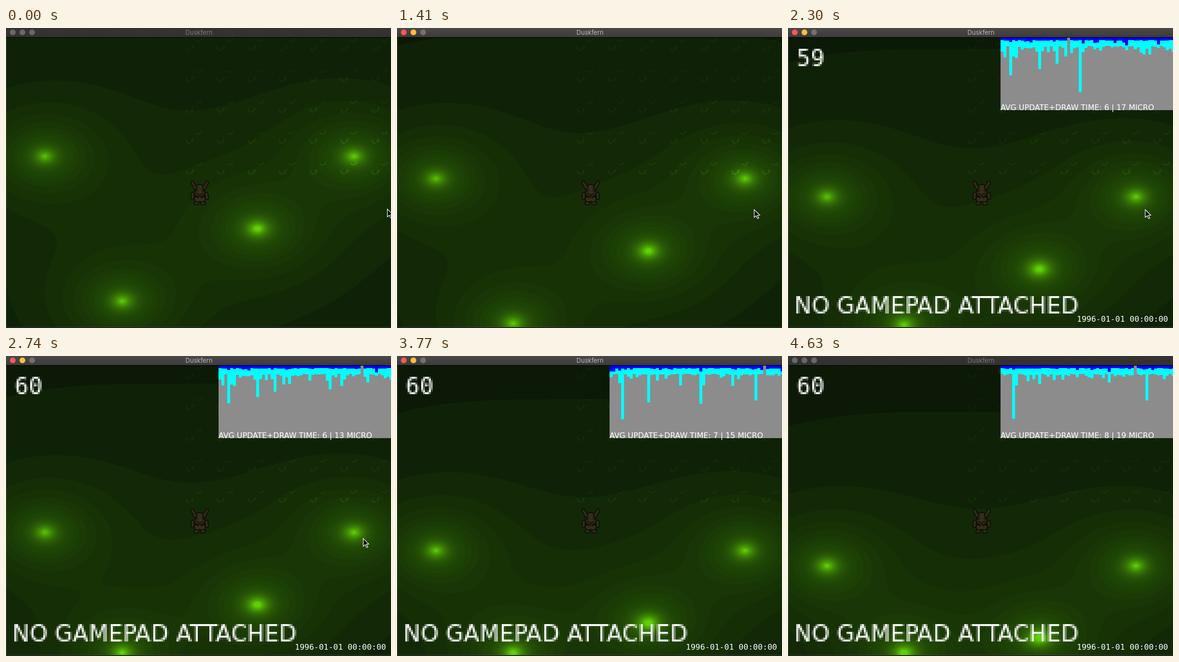
Write an HTML page with a canvas that moves like this. It is 797 by 621 pixels and loops after 4730 ms.

```html
<!DOCTYPE html>
<html lang="en">
<head>
<meta charset="utf-8">
<title>Duskfern</title>
<style>
html, body { margin: 0; width: 797px; height: 621px; overflow: hidden; background: #000; }
canvas { display: block; }
</style>
</head>
<body>
<canvas id="stage" width="797" height="621"></canvas>
<script>
const W = 797, H = 621, TOP = 20, SCENE_H = 599, LOOP = 4730;
const SANS = '"DejaVu Sans", sans-serif', MONO = '"DejaVu Sans Mono", monospace';
const ctx = document.getElementById('stage').getContext('2d');
const field = ctx.createImageData(W, SCENE_H);
const pixels = new Uint32Array(field.data.buffer);
const small = document.createElement('canvas');
small.width = 300; small.height = 40;
const smallCtx = small.getContext('2d');

// The screen refreshes in four runs of eight evenly spaced steps.
const RUNS = [[130, 1120], [1270, 2300], [2440, 3470], [3620, 4630]];
function snap(t) {
  let at = 0;
  for (const [from, to] of RUNS)
    for (let j = 0; j < 8; j++) {
      const step = from + (to - from) * j / 7;
      if (t >= step - 6) at = step;
    }
  return at;
}

// Light strength (in thousandths) to banded green; bands are finer near the lamps.
const shades = Uint32Array.from({ length: 1061 }, (_, i) => {
  const band = i < 605 ? .069 : .0345;
  const level = (Math.floor((i / 1000 + .016) / band) + .5) * band - .016;
  const green = 22 + 52 * (1 - Math.exp(-2.8 * level)) + 128 * (level / 1.06) ** 6;
  return 0xff000000 | 6 << 16 | Math.round(green) << 8 | Math.round(green * .47 - 1);
});

function drawLights(t) {
  const fall = t * .0364;
  const lights = [[80, 265], [720, 265], [520, 415], [240, 565]]
    .map(([x, y]) => [x, Math.min(y + fall, 614) - TOP]);
  for (let y = 0, i = 0; y < SCENE_H; y++)
    for (let x = 0; x < W; x++, i++) {
      let sum = 0;
      for (let k = 0; k < 4; k++) {
        const dx = (x - lights[k][0]) / 800, dy = (y - lights[k][1]) / 600;
        const d = 64 * Math.sqrt(dx * dx + dy * dy);
        sum += 1 / (1 + .09 * d + .032 * d * d);
      }
      pixels[i] = shades[Math.min(1060, sum * 1000 | 0)];
    }
  ctx.putImageData(field, 0, TOP);
}

function line(color, width, ...points) {
  ctx.beginPath();
  points.forEach(([x, y]) => ctx.lineTo(x, y));
  ctx.strokeStyle = color;
  ctx.lineWidth = width;
  ctx.stroke();
}

function drawGrass() {
  const glow = '#40382a';
  ctx.save();
  ctx.beginPath();
  ctx.rect(0, TOP, W, SCENE_H);
  ctx.clip();
  ctx.globalCompositeOperation = 'color-dodge';
  for (let row = 0; row < 6; row++)
    for (let col = 0; col < 7; col++) {
      ctx.save();
      ctx.translate(372 + 64 * col, 23 + 64 * row);
      if (row < 5) {
        line(glow, 3, [1, 16], [4, 23], [10, 23]);
        line(glow, 4, [16, 14], [12, 22]);
      }
      if (row < 5 || col) {
        ctx.beginPath();
        ctx.arc(27, -2, 6.5, 0, 2.6);
        ctx.lineWidth = 2.5;
        ctx.stroke();
      }
      ctx.restore();
    }
  ctx.restore();
}

function drawRabbit() {
  const fur = '#332d19', dark = '#0f0f08';
  ctx.save();
  ctx.translate(401, 316);
  ctx.lineCap = 'round';
  // Half of each part as width and two end points; the other half is its mirror.
  const ear = [4, [9, 15], [15, 4]], head = [16, [0, 17], [2, 24]], arm = [4, [14, 27], [15, 36]];
  const body = [11, [0, 36], [5, 38]], foot = [4, [5, 47], [9, 47]];
  const eye = [2, [5, 20], [9, 22]], muzzle = [2, [0, 30], [7, 26]], chest = [2, [3, 36], [9, 32]];
  const both = (color, grow, parts) => {
    for (const [width, ...ends] of parts)
      for (const side of [1, -1])
        line(color, width + grow, ...ends.map(([x, y]) => [x * side, y]));
  };
  for (const parts of [[body, foot], [arm], [head], [ear]]) {
    both(dark, 4, parts);
    both(fur, 0, parts);
  }
  both(dark, 0, [eye, muzzle, chest]);
  ctx.restore();
}

function text(string, x, y, font, color = '#fff') {
  ctx.font = font;
  ctx.fillStyle = color;
  ctx.fillText(string, x, y);
}

// Text set small and enlarged four times without smoothing.
function chunkyText(string, x, y, family) {
  smallCtx.clearRect(0, 0, small.width, small.height);
  smallCtx.font = `11.9px ${family}`;
  smallCtx.fillStyle = '#fff';
  smallCtx.fillText(string, 0, 30);
  ctx.imageSmoothingEnabled = false;
  ctx.drawImage(small, x, y - 120, small.width * 4, small.height * 4);
}

const random = n => { const v = Math.sin(n * 12.9898) * 43758.5453; return v - Math.floor(v); };

// A sweep over 60 columns; mostly even timings with a few long spikes.
function drawChart(t) {
  const now = Math.round(37 + (t - 1560) * .0616);
  ctx.fillStyle = '#8c8c8c';
  ctx.fillRect(440, TOP, 357, 150);
  for (let n = now - 59; n < now; n++) {
    const x = 440 + 6 * ((n + 60) % 60);
    ctx.fillStyle = '#0ff';
    ctx.fillRect(x, TOP, 6, Math.round(14 + 3 / (random(n) + .03)));
    ctx.fillStyle = '#00f';
    ctx.fillRect(x, TOP, 6, Math.round(4.5 + .7 / (random(n + 500) + .06)));
  }
}

function drawHud(t) {
  const reading = Math.floor((t - 1200) / 730);
  const update = 6 + Math.floor(Math.max(0, t - 1560) / 1500);
  const paint = [15, 17, 13, 15, 19][reading];
  drawChart(t);
  text(`AVG UPDATE+DRAW TIME: ${update} | ${paint} MICRO`, 440, 170, `15.8px ${SANS}`);
  chunkyText(reading === 1 ? 59 : 60, 18, 79, MONO);
  chunkyText('NO GAMEPAD ATTACHED', 13, 591, SANS);
  text('1996-01-01 00:00:00 -', 598, 608, `16.5px ${MONO}`);
}

function drawWindow(active) {
  const bar = ctx.createLinearGradient(0, 0, 0, 19);
  bar.addColorStop(0, active ? '#4b4947' : '#363433');
  bar.addColorStop(1, active ? '#3d3b39' : '#333130');
  ctx.fillStyle = bar;
  ctx.fillRect(0, 0, W, 19);
  ctx.fillStyle = '#000';
  ctx.fillRect(0, 19, W, 1);
  ctx.fillStyle = '#4a4f48';
  ctx.fillRect(0, TOP, 1, SCENE_H);
  ctx.fillRect(0, 619, W, 1);
  const colors = active ? ['#fc5753', '#fdbc40', '#73716f'] : Array(3).fill('#6a6867');
  colors.forEach((color, i) => {
    ctx.fillStyle = color;
    ctx.beginPath();
    ctx.arc(14 + 20 * i, 9, 6, 0, 7);
    ctx.fill();
  });
  ctx.textAlign = 'center';
  text('Duskfern', 399.5, 14, '13px Inter, sans-serif', active ? '#bbb9b8' : '#7c7a79');
  ctx.textAlign = 'left';
}

const ease = (t, from, to) => {
  const p = Math.max(0, Math.min(1, (t - from) / (to - from)));
  return p * p * (3 - 2 * p);
};

function drawCursor(t) {
  const enter = ease(t, 0, 560), leave = ease(t, 2700, 3390);
  ctx.save();
  ctx.translate(789.5 - 50 * enter + 7 * leave, 375 + enter + 260 * leave);
  const arrow = new Path2D('M0 0V16L4 12.5 7 18.5 9.5 17.5 6.5 11.5H11.5Z');
  ctx.fillStyle = '#000';
  ctx.fill(arrow);
  ctx.strokeStyle = '#fff';
  ctx.lineWidth = 1.2;
  ctx.stroke(arrow);
  ctx.restore();
}

function draw(t) {
  ctx.fillStyle = '#000';
  ctx.fillRect(0, 0, W, H);
  drawLights(t);
  drawGrass();
  drawRabbit();
  if (t > 1400) drawHud(t);
  drawWindow(t > 500 && t < 4300);
  drawCursor(t);
}

let start, shown = -1;
function tick(now) {
  start ??= now;
  const t = snap((now - start) % LOOP);
  if (t !== shown) draw(shown = t);
  requestAnimationFrame(tick);
}
requestAnimationFrame(tick);
</script>
</body>
</html>
```
